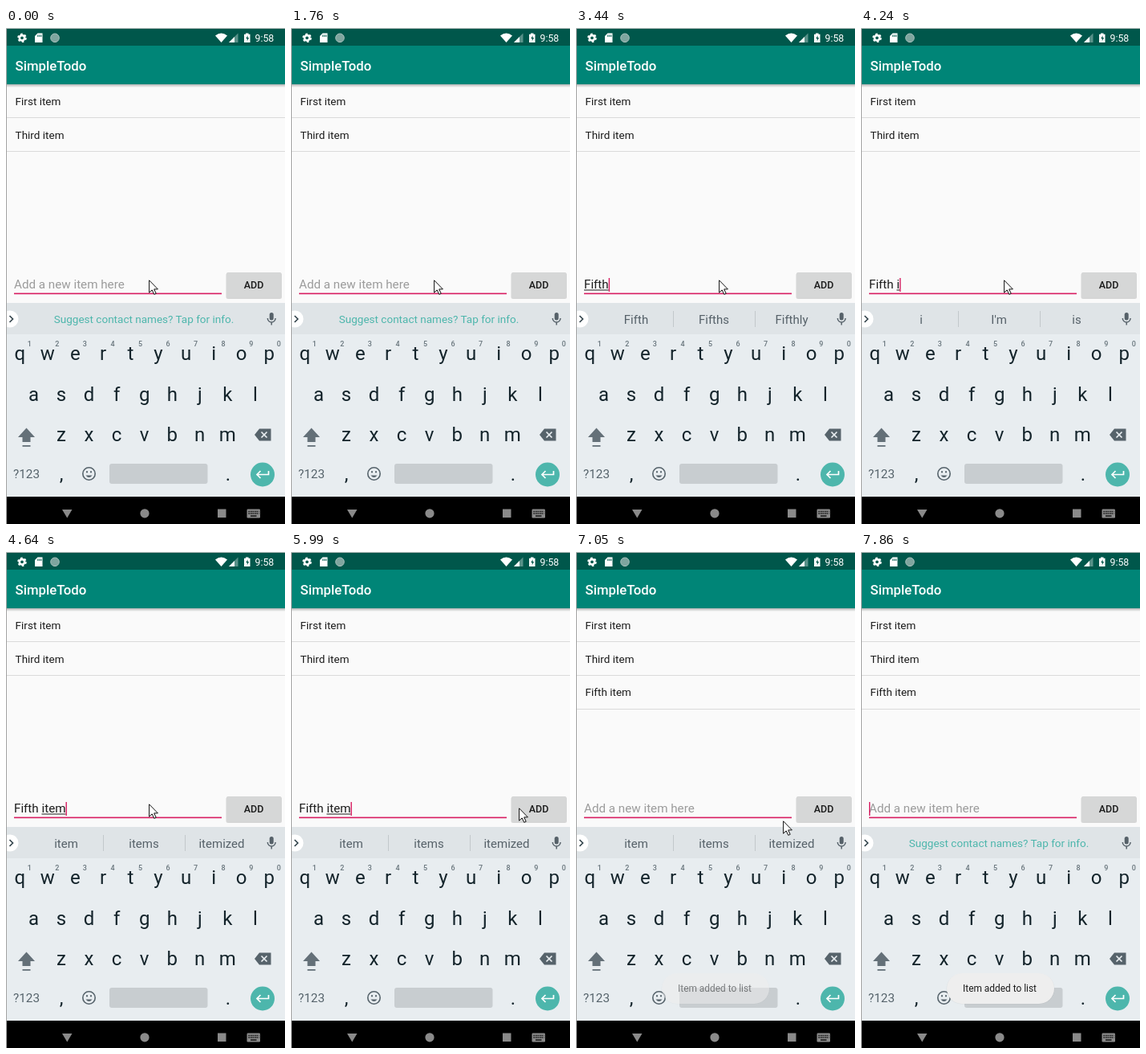
An HTML page that plays this animation: 348x617 px, repeating every 8000 ms.

```html
<!DOCTYPE html>
<html lang="en">
<head>
<meta charset="utf-8">
<title>Todo list</title>
<style>
  html, body { margin: 0; width: 100%; height: 100%; overflow: hidden; background: #fafafa; }
  svg { display: block; width: 348px; height: 617px; font-family: Roboto, sans-serif; }
  text { white-space: pre; }
  .item { font-size: 13.5px; fill: #1c1c1c; }
  .field { font-size: 15.2px; fill: #1c1c1c; }
  .key { font-size: 24px; fill: #14242b; }
  .hint { font-size: 9px; font-weight: 500; fill: #68757c; }
  .tip { font-size: 15px; fill: #566169; }
  .mid { text-anchor: middle; }
</style>
</head>
<body>
<svg viewBox="0 0 348 617">
  <defs>
    <linearGradient id="shade" x2="0" y2="1">
      <stop stop-color="#000" stop-opacity=".28"/>
      <stop offset="1" stop-color="#000" stop-opacity="0"/>
    </linearGradient>
    <clipPath id="buttonClip"><rect x="275" y="304" width="68.5" height="31.5" rx="2"/></clipPath>
  </defs>
  <rect width="348" height="617" fill="#fafafa"/>

  <!-- list -->
  <g id="list"></g>

  <!-- app bar -->
  <rect y="70" width="348" height="4" fill="url(#shade)"/>
  <rect y="22" width="348" height="48" fill="#008577"/>
  <rect width="348" height="22" fill="#00574b"/>
  <text x="11.5" y="52.5" font-size="16.8" font-weight="500" fill="#fff">SimpleTodo</text>

  <!-- status bar -->
  <g fill="#fff">
    <circle cx="20" cy="12.3" r="3.2" fill="none" stroke="#fff" stroke-width="2.6"/>
    <circle cx="20" cy="12.3" r="4.9" fill="none" stroke="#fff" stroke-width="1.8" stroke-dasharray="2.57 2.57"/>
    <path d="M39.5 6.5h6v11.5h-9.5v-8z"/>
    <path d="M39.8 8.5v2.5M41.8 8.5v2.5M43.8 8.5v2.5" stroke="#00574b"/>
    <circle cx="61" cy="12.3" r="5.3" fill="#7fa59f" stroke="#a9c2be"/>
    <path d="M261 9.5Q268.5 3.5 276 9.5L268.5 18z"/>
    <path d="M278 18L289.500 6.500V18z" opacity=".35"/>
    <path d="M278 18L285 11V18z"/>
    <path d="M299 6.500h3.500v1.300h2v10.200h-7.500v-10.200h2z"/>
    <path d="M301.500 9.300l-2.300 4h1.600v3l2.300-4.200h-1.600z" fill="#00574b"/>
    <text x="310.500" y="16.700" font-size="12.300">9:58</text>
  </g>

  <!-- entry row -->
  <rect x="10" y="329.600" width="259" height="1.600" fill="#d81b60"/>
  <text id="placeholder" class="field" x="10" y="324" style="fill:#9b9b9b">Add a new item here</text>
  <text id="typed" class="field" x="10" y="324"></text>
  <rect id="underline" y="325.500" height="1" fill="#1c1c1c"/>
  <rect id="caret" y="311" width="1.400" height="17" fill="#d81b60"/>
  <rect x="274.500" y="304.500" width="69.500" height="32.500" rx="2.500" fill="#000" opacity=".15"/>
  <rect x="275" y="304" width="68.500" height="31.500" rx="2" fill="#d6d7d7"/>
  <g clip-path="url(#buttonClip)"><circle id="ripple" cx="293" cy="326"/></g>
  <text class="mid" x="309" y="324" font-size="12.500" font-weight="500" fill="#1c1c1c">ADD</text>

  <!-- keyboard -->
  <rect y="342" width="348" height="241" fill="#e8edf0"/>
  <rect y="342" width="348" height="39" fill="#dfe4e7"/>
  <text id="promo" class="mid" x="172" y="367" font-size="13.530" fill="#4db6ac">Suggest contact names? Tap for info.</text>
  <g id="tips">
    <path d="M121.500 352v20M223.500 352v20" stroke="#c2c8cb"/>
    <text class="tip mid" x="75" y="368"></text>
    <text class="tip mid" x="172" y="368"></text>
    <text class="tip mid" x="269" y="368"></text>
  </g>
  <circle cx="5" cy="362" r="10.500" fill="#fff"/>
  <path d="M4.500 358l4 4-4 4" fill="none" stroke="#37474f" stroke-width="1.700"/>
  <g fill="none" stroke="#566169" stroke-width="1.500">
    <rect x="328.700" y="354" width="5" height="9.500" rx="2.500" fill="#566169" stroke="none"/>
    <path d="M326.300 361a4.900 4.900 0 0 0 9.800 0M331.200 366v3.500"/>
  </g>
  <g id="keys"></g>
  <path d="M25.500 497.500L36 509h-5.500v6h-10v-6H15z" fill="#647078"/>
  <rect x="20.500" y="519" width="10" height="1.800" fill="#647078"/>
  <path d="M316 498.500h14.500v15H316l-6-7.500z" fill="#56636b"/>
  <path d="M318.500 502.500l7 7M325.500 502.500l-7 7" stroke="#e8edf0" stroke-width="1.700"/>
  <text x="9" y="560" font-size="15.300" fill="#56636b">?123</text>
  <g fill="none" stroke="#56636b" stroke-width="1.600">
    <circle cx="103.500" cy="554.500" r="7.700"/>
    <path d="M99.500 556.500q4 5 8 0z" fill="#56636b" stroke="none"/>
    <path d="M100 552.300h2M105 552.300h2" stroke-width="2"/>
  </g>
  <rect x="129" y="542" width="122.500" height="25" rx="3" fill="#c8cdd0"/>
  <circle cx="320" cy="555.500" r="15" fill="#4db6ac"/>
  <path d="M327.500 551v4.500H313.500M317.500 551l-4.500 4.500 4.500 4.500" fill="none" stroke="#fff" stroke-width="1.700"/>

  <!-- navigation bar -->
  <rect y="583" width="348" height="34"/>
  <g fill="#8a8a8a">
    <path d="M70 599h12.500l-6.250 10.500z"/>
    <circle cx="173" cy="603.800" r="5.600"/>
    <rect x="264" y="598.500" width="10.500" height="10.500"/>
    <rect x="300.500" y="598.500" width="16.500" height="11" rx="1.200"/>
    <path d="M302.500 601.500h13M302.500 604h13" stroke="#000" stroke-width="1.400" stroke-dasharray="1.400 1.100"/>
    <path d="M305 607h7.500" stroke="#000" stroke-width="1.300"/>
  </g>

  <g id="toast">
    <rect x="106.500" y="524.500" width="135" height="38" rx="19" fill="#000" opacity=".05"/>
    <rect x="107" y="524" width="134" height="38" rx="19" fill="#eeeeee"/>
    <text class="mid" x="173" y="546.800" font-size="11.900" fill="#1c1c1c">Item added to list</text>
  </g>

  <path d="M.5.500V348" stroke="#a4a4a4"/>
  <path d="M.5 348V617" stroke="#a4a4a4"/>
  <path d="M0 .5H348" stroke="#b4bcba"/>

  <path id="pointer" d="M.6.800V16.200L4.200 12.900 6.800 18.400 9.200 17.300 6.700 11.900H11.400z" fill="#fff" stroke="#111"/>
</svg>
<script>
const LOOP = 8000;
const $ = id => document.getElementById(id);
const put = (parent, tag, attrs, text = "") => {
  const el = document.createElementNS("http://www.w3.org/2000/svg", tag);
  for (const name in attrs) el.setAttribute(name, attrs[name]);
  el.textContent = text;
  parent.append(el);
  return el;
};

const rows = ["First item", "Third item", "Fifth item"].map((label, i) => {
  const row = put($("list"), "g", {});
  const y = 70 + i * 41.8;
  put(row, "text", { class: "item", x: 11.6, y: y + 25.7 }, label);
  put(row, "rect", { x: 0, y: Math.round(y + 41), width: 348, height: 1, fill: "#dadada" });
  return row;
});

[["qwertyuiop", 17.3, 413], ["asdfghjkl", 34.5, 463.5], ["zxcvbnm", 69, 514]].forEach(([line, x0, y], r) =>
  [...line].forEach((letter, i) => {
    const x = x0 + i * 34.55;
    put($("keys"), "text", { class: "key mid", x, y }, letter);
    if (!r) put($("keys"), "text", { class: "hint mid", x: x + 12, y: 396 }, (i + 1) % 10);
  }));
put($("keys"), "text", { class: "key mid", x: 69, y: 563 }, ",");
put($("keys"), "text", { class: "key mid", x: 277, y: 563 }, ".");

// Each step holds until the next; unnamed values carry over.
// done: finished text, word: word being composed, press: [ripple radius, opacity]
const steps = [
  [0, { done: "", word: "", caret: 0, tips: "", at: [178, 313], press: [0, 0], count: 2, toast: 0 }],
  [250, { caret: 1 }],
  [680, { caret: 0 }],
  [1210, { caret: 1 }],
  [1760, { caret: 0 }],
  [2010, { word: "F", caret: 1 }],
  [2380, { word: "Fi" }],
  [2780, { word: "Fif", tips: "Fif Fifth Fifties" }],
  [3190, { caret: 0 }],
  [3440, { word: "Fifth", caret: 1, tips: "Fifth Fifths Fifthly" }],
  [3840, { done: "Fifth ", word: "", tips: "grade and of" }],
  [4240, { word: "i", tips: "i I'm is" }],
  [4360, { word: "it", tips: "it its it's" }],
  [4640, { word: "item", tips: "item items itemized" }],
  [5170, { caret: 0 }],
  [5600, { at: [200, 310] }],
  [5720, { at: [240, 308], caret: 1 }],
  [5840, { at: [271, 311] }],
  [5990, { at: [284, 318] }],
  [6110, { at: [291, 323] }],
  [6230, { at: [293, 326], caret: 0 }],
  [6390, { at: [277, 319], press: [12, .1] }],
  [6540, { done: "", word: "", caret: 1, count: 3, press: [60, .1] }],
  [6660, { press: [80, .06] }],
  [6810, { at: [266, 325], press: [80, .03] }],
  [6930, { at: [260, 331], press: [0, 0], toast: .2 }],
  [7050, { at: [258, 334], caret: 0, toast: .5 }],
  [7200, { at: [232, 390], toast: .85 }],
  [7350, { at: [172, 505], toast: 1, tips: "" }],
  [7470, { at: [125, 581], caret: 1 }],
  [7620, { at: [90, 591] }],
  [7740, { at: [71, 595] }],
  [7860, { at: null }]
];
let carried = {};
for (const step of steps) carried = step[1] = { ...carried, ...step[1] };

const show = (el, on) => el.setAttribute("visibility", on ? "visible" : "hidden");

function draw(s) {
  const typed = $("typed");
  const widthOf = text => {
    typed.textContent = text;
    return text ? typed.getComputedTextLength() : 0;
  };
  const start = widthOf(s.done), end = widthOf(s.done + s.word);
  $("underline").setAttribute("x", 10 + start);
  $("underline").setAttribute("width", end - start);
  $("caret").setAttribute("x", 10 + end);
  show($("caret"), s.caret);
  show($("placeholder"), !end);

  show($("promo"), !s.tips);
  show($("tips"), s.tips);
  const words = s.tips.split(" ");
  $("tips").querySelectorAll("text").forEach((el, i) => el.textContent = words[i] || "");

  rows.forEach((row, i) => show(row, i < s.count));
  $("ripple").setAttribute("r", s.press[0]);
  $("ripple").setAttribute("opacity", s.press[1]);
  $("toast").setAttribute("opacity", s.toast);
  show($("pointer"), s.at);
  if (s.at) $("pointer").setAttribute("transform", `translate(${s.at})`);
}

let shown;
function tick() {
  const t = performance.now() % LOOP;
  const state = steps.findLast(step => step[0] <= t)[1];
  if (state !== shown) draw(shown = state);
  requestAnimationFrame(tick);
}
tick();
</script>
</body>
</html>
```
